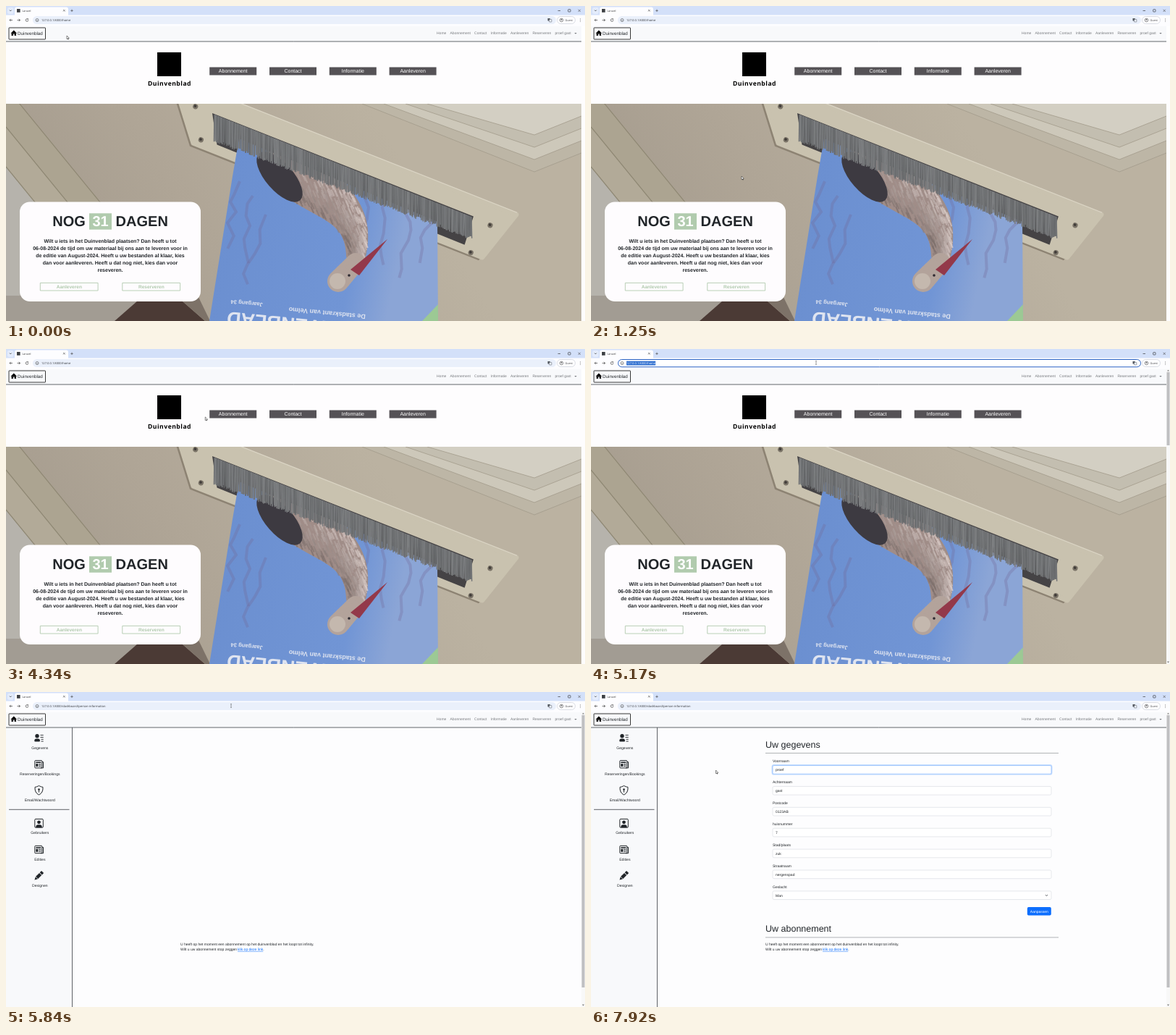
Recreate the animation shown at these times as an HTML page with a canvas. Size 800 px wide and 435 px high, loop 8000 ms.

```html
<!DOCTYPE html>
<html lang="nl">
<head>
<meta charset="utf-8">
<title>Duinvenblad</title>
<style>
html, body { margin: 0; width: 100%; height: 100%; overflow: hidden; background: #fff; }
canvas { display: block; width: 100vw; height: 100vh; }
</style>
</head>
<body>
<canvas id="stage"></canvas>
<script>
const W = 800, H = 435, LOOP = 8000;
const SANS = '"Liberation Sans", Arial, sans-serif';
const UI = '"Open Sans", sans-serif';
const INK = '#212529', GREY = '#444', BLUE = '#0d6efd', GREEN = '#b1cbae';
const NAME = 'Duinvenblad';
const HOME_URL = '127.0.0.1:8000/home';
const DASH_URL = '127.0.0.1:8000/dashboard/person-information';

// moments at which the page changes hard
const FOCUS = 4750, TYPE = 5420, ENTER = 5700, FADE = 5750, DASH = 5840, FORM = 5920, FIELD = 6000;

let c;

// ---- drawing helpers ----
function rect(x, y, w, h, color) {
  c.fillStyle = color;
  c.fillRect(x, y, w, h);
}
function paint(fill, stroke, lw) {
  if (fill) { c.fillStyle = fill; c.fill(); }
  if (stroke) { c.strokeStyle = stroke; c.lineWidth = lw; c.stroke(); }
}
function box(x, y, w, h, r, fill, stroke, lw = 0.7) {
  c.beginPath();
  c.roundRect(x, y, w, h, r);
  paint(fill, stroke, lw);
}
function dot(x, y, r, fill, stroke, lw = 0.6) {
  c.beginPath();
  c.arc(x, y, r, 0, 7);
  paint(fill, stroke, lw);
}
function trace(p) {
  c.beginPath();
  for (let i = 0; i < p.length; i += 2) c.lineTo(p[i], p[i + 1]);
}
function line(color, lw, ...p) {
  trace(p);
  paint(null, color, lw);
}
function poly(color, ...p) {
  trace(p);
  c.closePath();
  paint(color);
}
function at(x, y, angle, draw) {
  c.save();
  c.translate(x, y);
  c.rotate(angle);
  draw();
  c.restore();
}
function text(s, x, y, size, color = INK, align = 'left', font = SANS, weight = 400) {
  c.font = `${weight} ${size}px ${font}`;
  c.textAlign = align;
  c.fillStyle = color;
  c.fillText(s, x, y);
  return c.measureText(s).width;
}
const bold = (s, x, y, size, color, align) => text(s, x, y, size, color, align, SANS, 700);
const label = (s, x, y, size, color) => text(s, x, y, size, color, 'left', UI);

function xMark(x, y, r) {
  line(GREY, 0.6, x - r, y - r, x + r, y + r);
  line(GREY, 0.6, x + r, y - r, x - r, y + r);
}
function chevron(x, y, r, color = '#333') {
  line(color, 0.8, x - r, y - r / 2, x, y + r / 2, x + r, y - r / 2);
}
function random(seed) {
  return () => (seed = (seed * 16807) % 2147483647) / 2147483647;
}
const mix = (a, b, k) => a + (b - a) * k;
const bezier = (a, b, d, e, k) => mix(mix(mix(a, b, k), mix(b, d, k), k), mix(mix(b, d, k), mix(d, e, k), k), k);

// ---- photo ----
function photo() {
  c.beginPath();
  c.rect(0, 135, 795, 300);
  c.clip();
  const wall = c.createLinearGradient(0, 435, 500, 135);
  wall.addColorStop(0, '#a0978a');
  wall.addColorStop(0.5, '#afa596');
  wall.addColorStop(1, '#bbb2a1');
  rect(0, 135, 795, 300, wall);
  door();
  moulding();
  slot();
  newspaper();
  bristles();
}

// parallel slanted strips at the left, floor below them
function door() {
  ['#aca491', '#b2aa98', '#b6b3ac'].forEach((color, i) => {
    const y = 112 + i * 55;
    poly(color, 0, y, 264, y + 323, 0, H);
    line('#8f8874', 1.2, 0, y, 264, y + 323);
  });
  rect(0, 400, 185, 35, '#a29c93');
  poly('#4b3a35', 190, 400, 235, 400, 275, H, 150, H);
  poly('#7d7268', 235, 400, 265, 400, 282, H, 275, H);
}

function moulding() {
  ['#bdb6a6', '#cdc8ba', '#c3beb0', '#d3cfc3'].forEach((color, i) => {
    const x = 492 + i * 30, y = 229 - i * 17;
    poly(color, x, 135, 730, y, 795, y - 26, 795, 135);
    line('#a29b8b', 0.8, x, 135, 730, y, 795, y - 26);
  });
}

function slot() {
  at(285, 148, 0.376, () => {
    c.lineJoin = 'round';
    const shape = [-67, -24, 442, -24, 420, 48, -9, 48];
    at(-3, 6, 0, () => poly('#8d8373', ...shape));
    poly('#c9c2af', ...shape);
    c.closePath();
    paint(null, '#c9c2af', 7);
    line('#dbd5c5', 1.2, -67, -27, 442, -27);
    poly('#454345', 0, 0, 388, 0, 391, 41, 22, 38);
    for (const [x, y] of [[-25, 0], [-1, 40], [414, 3], [403, 48]]) {
      dot(x, y, 3.6, '#7a7367');
      dot(x - 0.5, y - 0.5, 1.8, '#3f3b38');
    }
  });
}

function newspaper() {
  const paper = c.createLinearGradient(300, 0, 600, 60);
  paper.addColorStop(0, '#84a0d6');
  paper.addColorStop(0.15, '#6b8fd0');
  paper.addColorStop(0.8, '#7195d5');
  paper.addColorStop(1, '#8ba5d6');
  c.save();
  trace([322, 183, 596, 298, 597, H, 281, H, 313, 235]);
  c.clip();
  rect(270, 135, 340, 300, paper);
  branches();
  poly('#9cc994', 597, 412, 597, H, 575, H);
  bird();
  c.restore();

  const flip = Math.PI + 0.095, print = '#dfe4f0';
  at(497, 426, flip, () => bold('De stadskrant van Velmo', 0, 0, 9, print));
  at(355, 410, flip, () => bold('Jaargang 34', 0, 0, 7.6, print));
  at(306, 422, flip, () => bold(NAME.toUpperCase(), 0, 0, 27, print, 'right'));
}

function branches() {
  const rnd = random(5);
  for (let i = 0; i < 8; i++) {
    let x = i < 4 ? 305 + i * 18 : 500 + (i - 4) * 26, y = 230 + rnd() * 70;
    const p = [x, y];
    for (let n = 0; n < 6; n++) p.push(x += rnd() * 24 - 14, y += 10 + rnd() * 12);
    line('rgba(112, 104, 150, 0.3)', 4, ...p);
  }
}

// feathers follow a curve from the body down to the neck
function bird() {
  const px = k => bezier(398, 440, 492, 483, k), py = k => bezier(222, 268, 278, 348, k);
  const thick = k => mix(40, 13, k);
  for (let k = 0; k <= 1; k += 0.02) dot(px(k), py(k), thick(k), '#a08d88');
  const rnd = random(31);
  for (let i = 0; i < 420; i++) {
    const k = rnd(), side = rnd() * 2 - 1;
    const x = px(k) + side * thick(k) * 0.8, y = py(k) - side * thick(k) * 0.5;
    const v = 150 + side * 45 + rnd() * 30;
    line(`rgba(${v + 8}, ${v - 6}, ${v - 10}, 0.6)`, 2, x, y, x + 4, y + 9);
  }
  at(378, 236, 0.85, () => {
    c.beginPath();
    c.ellipse(0, 0, 43, 19, 0, 0, 7);
    paint('#3d3a41');
  });
  for (let k = 0; k <= 1; k += 0.1) dot(mix(483, 459, k), mix(354, 380, k), 13 + 2 * k, '#b3a39b');
  dot(458, 380, 11, '#c4b8ae');
  poly('#93394a', 476, 364, 527, 322, 488, 372);
  dot(474, 372, 1.8, '#2d2930');
}

function bristles() {
  const rnd = random(17);
  for (let i = 0; i < 420; i++) {
    const k = i / 419, x = 288 + 355 * k, y = 150 + 141 * k;
    const v = 100 + rnd() * 28;
    line(`rgb(${v}, ${v + 2}, ${v + 4})`, 1.5, x, y, x - 1 + rnd() * 2, y + 33 + rnd() * 5 - 6 * k);
  }
}

// ---- browser window ----
function browser(t, url) {
  const loading = t >= ENTER && t < DASH;
  rect(0, 0, W, 13, '#d3e0f9');
  rect(0, 12.5, W, 15, '#fdfdff');
  box(2, 2, 8.5, 9, 2.5, '#e4ecfc');
  chevron(6.3, 6.3, 1.3);
  box(12, 1.5, 74, 12, [3, 3, 0, 0], '#fdfdff');
  if (!loading) rect(15, 4, 4.6, 4.8, '#3d4043');
  label('Laravel', 22.5, 7.9, 3.6, '#333');
  xMark(80.3, 6.3, 1.3);
  at(91, 6.4, Math.PI / 4, () => xMark(0, 0, 1.2));
  line('#222', 0.6, 762.5, 6.5, 766, 6.5);
  box(776.7, 4.7, 3.3, 3.3, 0.5, null, '#222', 0.6);
  xMark(792.2, 6.4, 1.6);

  for (const [x, angle] of [[7, 0], [17.5, Math.PI]]) {
    at(x, 19.5, angle, () => {
      line(GREY, 0.7, 2, 0, -2, 0);
      line(GREY, 0.7, -0.2, -1.8, -2, 0, -0.2, 1.8);
    });
  }
  if (loading) xMark(29, 19.5, 1.5);
  else {
    c.beginPath();
    c.arc(29, 19.5, 1.8, 0, 5.2);
    paint(null, GREY, 0.7);
    rect(29.6, 17.4, 1.3, 1.3, GREY);
  }
  suggestions(t);
  if (t >= FOCUS && t < FADE) box(37.5, 14.5, 722, 10.3, 5.2, '#fff', '#2a62c4', 1);
  else box(37, 14, 723, 11, 5.5, '#eaf0fb');
  dot(43, 19.5, 2, null, GREY);
  line(GREY, 0.6, 43, 19.2, 43, 20.7);
  address(t, url);
  box(748.5, 17, 3.2, 3.6, 0.4, '#50555c');
  box(750.5, 18.4, 3.4, 3.6, 0.4, '#eaf0fb', '#50555c', 0.5);
  box(761.5, 14.5, 25, 10, 5, '#fdfdff', '#c5cad3', 0.6);
  dot(767.5, 19.5, 2.3, null, GREY);
  dot(767.5, 18.9, 0.8, GREY);
  label('Guest', 772.5, 20.9, 3.8, GREY);
  for (let i = -1; i < 2; i++) dot(793.5, 19.5 + i * 1.8, 0.45, '#333');
}

function address(t, url) {
  const size = 4.08;
  const show = (s, x, marked) => {
    c.font = `400 ${size}px ${UI}`;
    if (marked) rect(x, 16.7, c.measureText(s).width, 5.8, '#2f6fd0');
    return label(s, x, 21, size, marked ? '#fff' : '#33363b');
  };
  if (t >= TYPE && t < ENTER) {
    const typed = 15 + Math.floor((t - TYPE) / 85);
    show(DASH_URL.slice(typed), 49 + show(DASH_URL.slice(0, typed), 49), true);
  } else {
    show(url, 49, t >= FOCUS && t < TYPE);
  }
}

function suggestions(t) {
  if (t < TYPE || t >= DASH) return;
  c.globalAlpha = t < FADE ? 1 : 0.12;
  box(36, 13.5, 724, 44.5, 5, '#fff', '#c9ced8', 0.8);
  rect(36.5, 27.5, 723, 11.5, '#e6ebf3');
  [' - Laravel', ' - Zoeken'].forEach((s, i) => {
    const y = 33 + i * 12;
    dot(43, y, 1.6, null, '#555');
    const w = label(DASH_URL, 49, y + 1.4, 4.08, '#1558c0');
    label(s, 49 + w, y + 1.4, 4.08, '#666');
  });
  c.globalAlpha = 1;
}

function scrollbar(thumbEnd) {
  rect(795, 27.5, 5, 407.5, '#f8f8f8');
  rect(795.5, 32, 4, thumbEnd - 32, '#bfbfc1');
  poly('#777', 796, 30.6, 797.5, 28.8, 799, 30.6);
  poly('#777', 796, 431.6, 797.5, 433.4, 799, 431.6);
}

function navbar() {
  rect(0, 27.5, 795, 21.5, '#f8f9fb');
  line('#50565b', 0.9, 0, 49, 795, 49);
  box(4, 30, 50.5, 16, 0.5, null, '#222', 0.9);
  poly('#000', 6.5, 37.8, 10.8, 33.4, 15.1, 37.8);
  rect(7.6, 37.5, 6.4, 3.5, '#000');
  rect(9.9, 38.6, 1.8, 2.4, '#f8f9fb');
  text(NAME, 16, 39.8, 6.25);
  let x = 595;
  for (const s of ['Home', 'Abonnement', 'Contact', 'Informatie', 'Aanleveren', 'Reserveren', 'proef gast'])
    x += text(s, x, 39.4, 5, '#777a7e') + 5.2;
  poly('#777a7e', 785.3, 37, 788.7, 37, 787, 38.8);
}

// ---- pages ----
function homePage() {
  rect(0, 49, W, 386, '#fefdfe');
  rect(209, 64, 33, 33, '#000');
  c.letterSpacing = '0.5px';
  text(NAME, 226, 110, 8.6, '#000', 'center', UI, 700);
  c.letterSpacing = '0px';
  ['Abonnement', 'Contact', 'Informatie', 'Aanleveren'].forEach((s, i) => {
    const x = 281.2 + i * 82.8;
    rect(x, 84.5, 65, 11, '#555256');
    text(s, x + 32.5, 92.4, 7, '#fff', 'center');
  });
  c.drawImage(photoLayer, 0, 0, W, H);

  box(19, 270.5, 250, 137.5, 14, '#fefcfe');
  bold('NOG', 64.3, 304.3, 20);
  rect(115, 286.3, 31, 22.4, GREEN);
  bold('31', 130.5, 304.3, 20, '#fff', 'center');
  bold('DAGEN', 151.6, 304.3, 20);
  [`Wilt u iets in het ${NAME} plaatsen? Dan heeft u tot`,
    '06-08-2024 de tijd om uw materiaal bij ons aan te leveren voor in',
    'de editie van August-2024. Heeft u uw bestanden al klaar, kies',
    'dan voor aanleveren. Heeft u dat nog niet, kies dan voor',
    'reseveren.'
  ].forEach((s, i) => bold(s, 144, 326.8 + i * 10, 7, INK, 'center'));
  ['Aanleveren', 'Reserveren'].forEach((s, i) => {
    const x = 47.3 + i * 113.5;
    box(x, 382.4, 79.8, 10.6, 0, null, GREEN, 0.9);
    bold(s, x + 40, 390.1, 6.55, GREEN, 'center');
  });
}

// icons are drawn around their own centre
const icons = {
  person() {
    dot(-2.5, -2.7, 2.7, INK);
    box(-6.2, 1.1, 7.6, 4, [2.5, 2.5, 0.8, 0.8], INK);
    for (let i = 0; i < 4; i++) rect(i < 2 ? 2 : 3, -4.2 + i * 2.8, i < 2 ? 4.2 : 3.2, 0.9, INK);
  },
  news() {
    box(-5.7, -5, 10, 10.3, 0.8, null, INK, 1);
    line(INK, 1, 4.5, -3, 6, -3, 6, 5.3, 2.5, 5.3);
    rect(-4.2, -3.2, 7, 1.6, INK);
    rect(-4.2, -0.6, 3, 4, INK);
    for (let i = 0; i < 3; i++) rect(-0.3, -0.6 + i * 1.6, 3.2, 0.8, INK);
  },
  shield() {
    c.beginPath();
    c.moveTo(0, -6.3);
    c.quadraticCurveTo(3, -4.7, 5.5, -4.4);
    c.quadraticCurveTo(6, 3.5, 0, 6.2);
    c.quadraticCurveTo(-6, 3.5, -5.5, -4.4);
    c.quadraticCurveTo(-3, -4.7, 0, -6.3);
    paint(null, INK, 1);
    dot(0, -1.2, 1.3, INK);
    rect(-0.5, -1, 1, 3.8, INK);
  },
  portrait() {
    box(-5.7, -5.8, 11.5, 11.8, 1.2, null, INK, 1);
    dot(0, -1.4, 2.4, INK);
    box(-4.2, 2.1, 8.4, 3.7, [3, 3, 0, 0], INK);
  },
  pencil() {
    c.rotate(-Math.PI / 4);
    poly(INK, -8.5, 0, -4.5, -2.2, -4.5, 2.2);
    rect(-4, -2.2, 7, 4.4, INK);
    rect(3.8, -2.2, 3.4, 4.4, INK);
  }
};
const menu = [['Gegevens', 'person'], ['Reserveringen/Bookings', 'news'], ['Email/Wachtwoord', 'shield'],
  ['Gebruikers', 'portrait'], ['Edities', 'news'], ['Designen', 'pencil']];

function sidebar() {
  rect(0, 49.4, 91.5, 386, '#f8f9fb');
  line('#4d5156', 0.9, 91.5, 49, 91.5, H);
  line('#4d5156', 0.9, 4, 162.3, 87.5, 162.3);
  menu.forEach(([s, icon], i) => {
    const y = 63.4 + i * 36.2 + (i > 2 ? 9.2 : 0);
    at(45.5, y, 0, icons[icon]);
    text(s, 46.8, y + 15.2, 5.1, INK, 'center');
  });
}

function dashboard(t) {
  rect(0, 49, W, 386, '#fdfdfe');
  sidebar();
  text(`U heeft op het moment een abonnement op het ${NAME.toLowerCase()} en het loopt tot infinity.`, 241, 349.6, 5);
  text('Wilt u uw abonnement stop zeggen', 241, 357.2, 5);
  const w = text('klik op deze link', 320, 357.2, 5, BLUE);
  rect(320, 357.9, w, 0.5, BLUE);
  text('.', 320 + w, 357.2, 5);
  if (t >= FORM) form(t >= FIELD);
}

function form(active) {
  [['Uw gegevens', 76.5], ['Uw abonnement', 331]].forEach(([s, y]) => {
    text(s, 241, y, 12.5);
    line('#8f9296', 0.7, 241, y + 7.9, 646, y + 7.9);
  });
  const fields = { Voornaam: 'proef', Achternaam: 'gast', Postcode: '0123AB', huisnummer: '7',
    'Stad/plaats': 'zuk', Straatnaam: 'nergenspad', Geslacht: 'Man' };
  Object.entries(fields).forEach(([name, value], i) => {
    const y = 101.5 + i * 28.9, lit = active && !i;
    text(name, 251, y - 4.4, 5);
    if (lit) box(250.3, y - 0.7, 386.4, 13.1, 2.5, null, '#c2dbfe', 1.4);
    box(251, y, 385, 11.7, 1.9, '#fff', lit ? '#86b7fe' : '#dcdfe4');
    text(value, 255, y + 7.6, 5);
  });
  chevron(629.4, 280.8, 1.6, '#343a40');
  box(602.8, 297, 33, 11.5, 1.9, BLUE);
  text('Aanpassen', 619.3, 304.5, 5, '#fff', 'center');
}

// ---- pointer: start, end, x, y of each move ----
const moves = [[90, 500, 150, 140], [920, 1250, 208, 235], [3840, 4670, 311, 19],
  [6170, 6920, 205, 150], [7000, 7840, 172.5, 108]];

function pointer(t) {
  let x = 84, y = 41;
  for (const [from, to, tx, ty] of moves) {
    const k = Math.min(1, Math.max(0, (t - from) / (to - from)));
    const ease = k * k * (3 - 2 * k);
    x = mix(x, tx, ease);
    y = mix(y, ty, ease);
  }
  at(x, y, 0, y < 26 ? () => {
    rect(-0.25, -2.5, 0.5, 5, '#333');
    for (const end of [-2.6, 2.2]) rect(-0.8, end, 1.6, 0.4, '#333');
  } : () => {
    line('#333', 1.1, 1.2, 3, 2.3, 5.2);
    poly('#fff', 0, 0, 0, 4.6, 3.3, 3.3);
    c.closePath();
    paint(null, '#333', 0.6);
  });
}

// ---- playback ----
function prepare(target) {
  const scale = window.devicePixelRatio || 1;
  target.width = W * scale;
  target.height = H * scale;
  const ctx = target.getContext('2d');
  ctx.scale(scale, scale);
  ctx.textRendering = 'geometricPrecision';
  return ctx;
}

function draw(t) {
  const onDash = t >= DASH;
  rect(0, 0, W, H, '#fff');
  if (onDash) dashboard(t);
  else homePage();
  navbar();
  if (t >= FOCUS) scrollbar(onDash ? 408 : 133);
  browser(t, t >= ENTER ? DASH_URL : HOME_URL);
  pointer(t);
}

const photoLayer = document.createElement('canvas');
c = prepare(photoLayer);
photo();
c = prepare(document.getElementById('stage'));

const start = performance.now();
function tick() {
  draw((performance.now() - start) % LOOP);
  requestAnimationFrame(tick);
}
tick();
</script>
</body>
</html>
```
